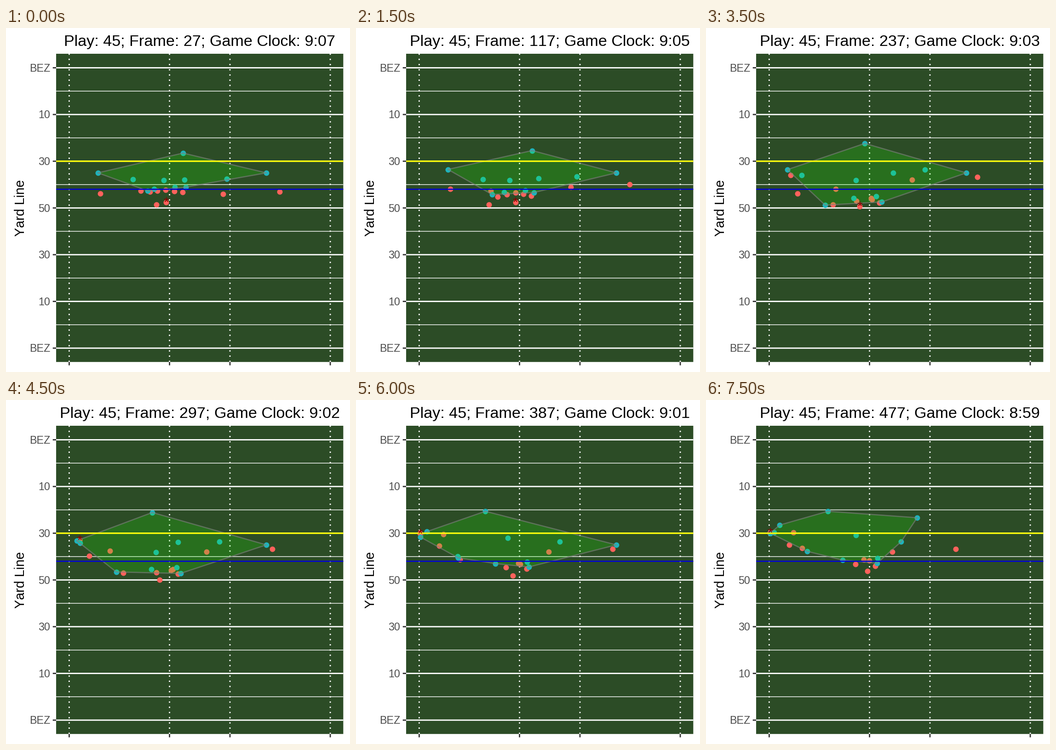
These frames come from a looping animation (748 px wide and 748 px high, 8000 ms). A matplotlib script:

```python
import numpy as np
import matplotlib.pyplot as plt
from matplotlib.animation import FuncAnimation
from matplotlib.patches import Polygon, Rectangle

plt.rcParams["font.family"] = "Liberation Sans"
plt.rcParams["text.kerning_factor"] = 6

SIZE = 748
PT = 0.72  # points per pixel at 100 dpi
STEPS = 16
THROW, CATCH = 7, 9
LEFT, RIGHT, TOP, BOTTOM = 109, 733.4, 56, 726.2
MID, YARD = 391.3, 5.08
T = np.arange(STEPS)


def ease(start, *moves):
    """Value at every step; each move (goal, begin, end) is a smoothstep."""
    value, last = np.full(STEPS, float(start)), start
    for goal, begin, end in moves:
        u = np.clip((T - begin) / (end - begin), 0, 1)
        value += (goal - last) * u * u * (3 - 2 * u)
        last = goal
    return value


def drift(start, end, sag=0):
    """Steady shift, bowed out and back by sag."""
    u = T / (STEPS - 1)
    return start + (end - start) * u + sag * np.sin(np.pi * u) ** 2


def track(x, y):
    return np.column_stack([x, y])


def convex_hull(points):
    pts = sorted(map(tuple, points))

    def half(seq):
        chain = []
        for x, y in seq:
            while len(chain) > 1:
                (px, py), (qx, qy) = chain[-2:]
                if (qx - px) * (y - py) - (qy - py) * (x - px) > 0:
                    break
                chain.pop()
            chain.append((x, y))
        return chain[:-1]

    return half(pts) + half(pts[::-1])


quarterback = track(ease(348, (334, 2, 7), (352, 9, 16)), ease(379, (391, 5, 8), (372, 9, 15)))
receiver = track(ease(205, (139, 4, 12)), ease(360, (289, 0, 13)))

# The pocket sags back together and then recovers.
POCKET = 21
offense = np.array([
    quarterback,
    receiver,
    track(ease(327, (181, 0, 9)), ease(384, (315, 3, 13))),                 # running back
    track(ease(293, (190, 6, 11)), ease(354, (288, 6, 13))),                # tight end
    track(ease(472, (400, 0, 18)), ease(361, (330, 0, 6))),                 # slot
    track(ease(595, (542, 5, 16)), ease(356, (324, 0, 6))),                 # far receiver
    track(ease(313, (208, 1, 16)), ease(356, (384, 0, 7), (320, 7, 16))),   # left tackle
    track(drift(329, 325), drift(354, 357, POCKET)),
    track(ease(347, (363, 3, 9), (343, 9, 15)), drift(352, 347, POCKET)),
    track(drift(366, 355), drift(355, 349, POCKET)),
    track(drift(384, 368), drift(357, 361, POCKET)),
])
defense = np.array([
    track(ease(308, (220, 0, 13)), ease(354, (385, 1, 7), (329, 7, 14))),   # left end
    track(ease(322, (297, 6, 15)), drift(350, 348, POCKET)),
    track(drift(367, 373), drift(346, 344, POCKET)),
    track(drift(391, 372), drift(346, 355, 1.35 * POCKET)),
    track(ease(385, (265, 2, 15)), ease(272, (242, 0, 11))),                # safety
    track(ease(200, (154, 5, 9), (160, 12, 15)),                            # left corner
          ease(315, (300, 1, 5), (308, 5, 7), (272, 8, 15))),
    track(ease(566, (459, 12, 15)), ease(315, (256, 12, 15))),              # right corner
    track(ease(276, (140, 3, 11)), ease(329, (289, 3, 16))),                # linebackers
    track(ease(343, (326, 1, 5), (222, 9, 12), (148, 12, 15)),
          ease(331, (343, 9, 12), (288, 12, 15))),
    track(ease(388, (422, 2, 5), (326, 5, 13)), ease(330, (294, 0, 16))),
    track(ease(480, (420, 5, 17)), ease(328, (308, 1, 7))),                 # nickel
])
flight = np.clip((T - THROW) / (CATCH - THROW), 0, 1)[:, None]
ball_path = quarterback * (1 - flight) + receiver * flight

fig = plt.figure(figsize=(SIZE / 100, SIZE / 100), dpi=100, facecolor="white")
ax = fig.add_axes([0, 0, 1, 1])
ax.set_xlim(0, SIZE)
ax.set_ylim(SIZE, 0)
ax.axis("off")


def line(xs, ys, color, width, z=1, **kw):
    ax.plot(xs, ys, color=color, lw=width * PT, zorder=z, solid_capstyle="butt",
            dash_capstyle="butt", snap=False, **kw)


def across(yard, color, width, z=1):
    line([LEFT, RIGHT], [MID + yard * YARD] * 2, color, width, z)


def label(x, y, text, px, color="black", **kw):
    return ax.text(x, y, text, fontsize=px * PT, color=color, va="baseline", **kw)


ax.add_patch(Rectangle((LEFT, TOP), RIGHT - LEFT, BOTTOM - TOP, fc="#2c4c26", lw=0,
                       zorder=0, snap=False))
for yard in range(-50, 51, 20):
    across(yard, "white", 1.42)
for x in (137.4, 355.6, 487, 705.1):
    line([x, x], [BOTTOM, TOP], "white", 2.83, ls=(0, (1, 3)))
    line([x, x], [BOTTOM, BOTTOM + 7.3], "#333333", 2.83)
for yard, name in zip(range(-60, 61, 20), ("BEZ", "10", "30", "50", "30", "10", "BEZ")):
    y = MID + yard * YARD
    across(yard, "white", 2.83)
    line([LEFT - 7.3, LEFT], [y, y], "#333333", 2.83)
    label(96, y + 8.3, name, 23.3, "#4d4d4d", ha="right")
label(40.5, MID, "Yard Line", 28.8, ha="center", rotation=90, rotation_mode="anchor")

dot = dict(s=(11.9 * PT) ** 2, lw=0)
offense_dots = ax.scatter([], [], color="#ff625c", zorder=2, **dot)
defense_dots = ax.scatter([], [], color="#1eb4bd", zorder=3, **dot)
hull = Polygon([(0, 0), (1, 0), (0, 1)], fc=(0.1, 1, 0, 0.2), ec=(0.5, 0.5, 0.5, 0.6),
               lw=2.6 * PT, joinstyle="round", zorder=4)
ax.add_patch(hull)
across(-8, "#0000dc", 2.5, 5)
across(-20, "yellow", 3, 5)
ball = label(0, 0, "*", 30, "darkred", ha="center", zorder=6)
title = label((LEFT + RIGHT) / 2, 39.3, "", 34.2, ha="center")


def update(step):
    offense_dots.set_offsets(offense[:, step])
    defense_dots.set_offsets(defense[:, step])
    hull.set_xy(convex_hull(defense[:, step]))
    ball.set_position(ball_path[step] + (0, 9))
    minutes, seconds = divmod(int(547.2 - step / 2), 60)
    title.set_text(f"Play: 45; Frame: {27 + 30 * step}; Game Clock: {minutes}:{seconds:02d}")
    return offense_dots, defense_dots, hull, ball, title


anim = FuncAnimation(fig, update, frames=STEPS, interval=500, repeat=True, repeat_delay=0)
plt.show()
```
